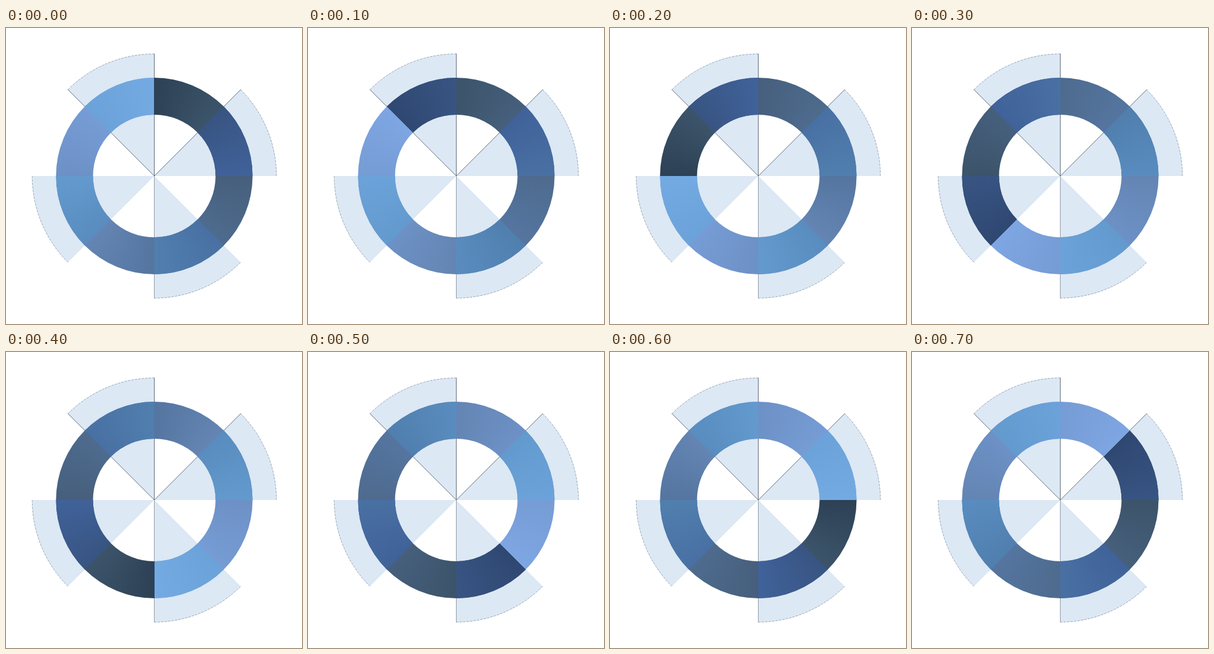
These frames come from a looping animation (512x512 px, 800 ms). An HTML page with a canvas:

```html
<!DOCTYPE html>
<html>
<head>
<meta charset="utf-8">
<title>Ring loader</title>
<style>
  html, body { margin: 0; width: 100%; height: 100%; overflow: hidden; background: #fff; }
  canvas { display: block; width: 100vw; height: 100vh; }
</style>
</head>
<body>
<canvas width="512" height="512"></canvas>
<script>
const ctx = document.querySelector('canvas').getContext('2d');
const CX = 256.5, CY = 256;
const BLADE = 211.5, OUTER = 170, INNER = 106;
const STEP = 100, STEPS = 8;
const GREY = ['#2d4155', '#3c546a', '#465f7c', '#4e6b8e', '#5575a0', '#6485b3', '#6d91c6', '#769cd5', '#7ea6e2'];
const BLUE = ['#2f4872', '#385482', '#40629a', '#4970a3', '#507fae', '#598cbf', '#639ace', '#6ba2d9', '#74aae2'];

// Clockwise angle from the top, in eighths of a turn
const angle = eighths => (eighths - 2) * Math.PI / 4;

function sweep(colors, start) {
  const g = ctx.createConicGradient(angle(start), CX, CY);
  colors.forEach((c, i) => g.addColorStop(i / (colors.length - 1), c));
  return g;
}

function sector(from, to, outer, inner, fill) {
  ctx.beginPath();
  ctx.arc(CX, CY, outer, angle(from), angle(to));
  ctx.arc(CX, CY, inner, angle(to), angle(from), true);
  ctx.closePath();
  ctx.fillStyle = fill;
  ctx.fill();
}

function spoke(at, color) {
  ctx.beginPath();
  ctx.moveTo(CX, CY);
  ctx.lineTo(CX + BLADE * Math.cos(angle(at)), CY + BLADE * Math.sin(angle(at)));
  ctx.strokeStyle = color;
  ctx.stroke();
}

function rim(from) {
  ctx.beginPath();
  ctx.arc(CX, CY, BLADE - 0.3, angle(from), angle(from + 1));
  ctx.strokeStyle = 'rgba(40, 55, 75, 0.5)';
  ctx.setLineDash([4, 2]);
  ctx.stroke();
  ctx.setLineDash([]);
}

function draw(step) {
  ctx.fillStyle = '#fff';
  ctx.fillRect(0, 0, 512, 512);

  const blades = [1, 3, 5, 7];
  for (const b of blades) sector(b, b + 1, BLADE, 0, '#dce8f4');
  ctx.lineWidth = 0.8;
  blades.forEach(rim);
  for (const s of [0, 1, 7]) spoke(s, '#34404e');
  spoke(4, '#75818f');

  const grey = sweep(GREY, -step), blue = sweep(BLUE, -step);
  sector(0, 8, OUTER, INNER, grey);
  for (const b of blades) sector(b, b + 1, OUTER, INNER, blue);
}

function tick() {
  draw(Math.floor(performance.now() / STEP) % STEPS);
  requestAnimationFrame(tick);
}
tick();
</script>
</body>
</html>
```
